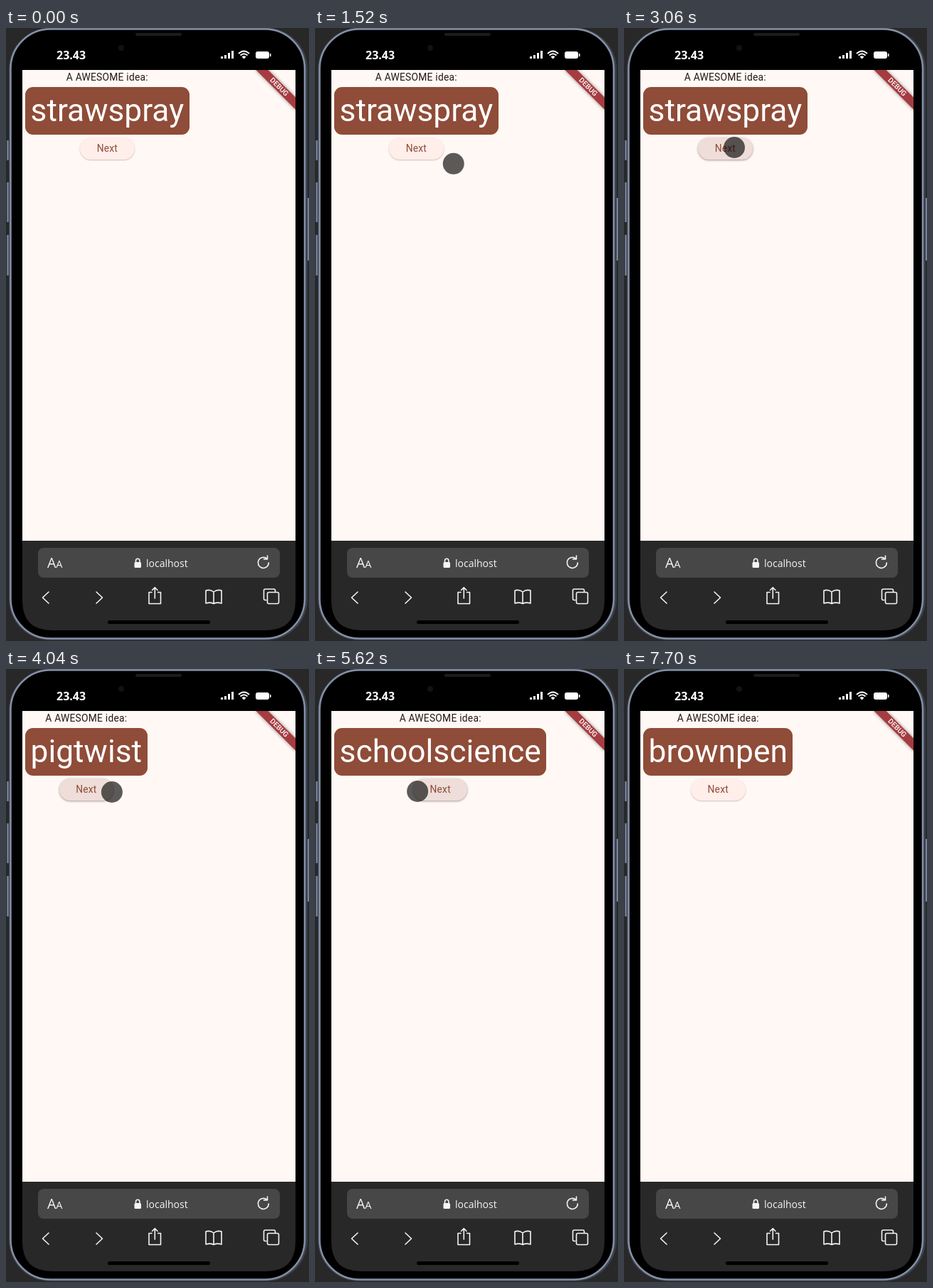
An HTML page for the animation above (8300 ms loop, 426 by 862 pixels).

```html
<!DOCTYPE html>
<html lang="en">
<head>
<meta charset="utf-8">
<title>Word idea app</title>
<style>
html, body { margin: 0; width: 100%; height: 100%; overflow: hidden; background: #282828; }
svg { position: absolute; left: 0; top: 0; }
#screen { position: absolute; left: 23px; top: 59px; width: 384px; height: 662px; overflow: hidden; background: #fff8f5; font-family: Roboto, sans-serif; }
#column { position: absolute; left: 0; top: 0; display: flex; flex-direction: column; align-items: center; white-space: nowrap; }
#label { position: relative; top: .5px; font-size: 13.8px; line-height: 19.7px; letter-spacing: .25px; color: #231917; }
#card { margin: 4px; padding: 7.9px 7.6px; border-radius: 11px; background: #8f4c38; color: #fff; font-size: 44.3px; line-height: 51.2px; }
#next { box-sizing: border-box; height: 31.5px; padding: 0 23.6px; border-radius: 16px; font-size: 13.8px; line-height: 31.5px; letter-spacing: .2px; color: #8f4c38; }
#banner { position: absolute; left: 320.5px; top: 17.8px; width: 80px; height: 11.8px; transform: rotate(45deg); background: #a63c40; box-shadow: 0 0 5px rgba(0,0,0,.45); color: #fff; font-size: 10px; font-weight: 500; line-height: 11.8px; text-align: center; }
#touch { position: absolute; left: -15px; top: -15px; width: 30px; height: 30px; border-radius: 50%; background: rgba(0,0,0,.64); }
</style>
</head>
<body>
<svg width="426" height="862" viewBox="0 0 426 862" fill="none" font-family="'Open Sans', 'Noto Sans', sans-serif">
  <!-- phone body -->
  <path d="M2.500 158V186M2.500 217V273M2.500 291V348M425 239V327" stroke="#77839a" stroke-width="2.500"/>
  <rect x="4" y="0" width="420" height="861" rx="58" fill="#3b414c"/>
  <rect x="6.500" y="1.500" width="413.500" height="857" rx="56" fill="#000" stroke="#8490a6" stroke-width="2.500"/>
  <rect x="182" y="7" width="65" height="4" rx="2" fill="#1c1c1c"/>
  <circle cx="162" cy="28" r="4" fill="#10121a"/>
  <path d="M23 721H407V805Q407 847 365 847H65Q23 847 23 805Z" fill="#282828"/>
  <!-- status bar -->
  <g fill="#fff">
    <text x="71" y="43.500" font-size="16" font-weight="700">23.43</text>
    <path d="M302 40h3v3h-3zM307 38h3v5h-3zM312 35h3v8h-3zM317 32h3v11h-3z"/>
    <rect x="351" y="33" width="19" height="10" rx="3"/>
    <rect x="371" y="36" width="1.500" height="4"/>
    <path d="M331.500 40.500Q334.500 38 337.500 40.500L334.500 43.500Z"/>
  </g>
  <path d="M327 36Q334.500 29 342 36M329.500 38.500Q334.500 34 339.500 38.500" stroke="#fff" stroke-width="2"/>
  <!-- browser bar -->
  <rect x="45" y="731" width="340" height="42" rx="8" fill="#474747"/>
  <g fill="#f5f5f5">
    <text x="58" y="759" font-size="19.500">A<tspan font-size="14.500">A</tspan></text>
    <text x="197" y="757.500" font-size="14">localhost</text>
    <rect x="180.500" y="751" width="9.500" height="8" rx="1.500"/>
  </g>
  <g stroke="#f5f5f5" stroke-width="1.600" stroke-linecap="round" stroke-linejoin="round">
    <path d="M182.500 751V749a2.700 2.700 0 0 1 5.400 0V751"/>
    <path d="M367 746.500A7.500 7.500 0 1 0 369.300 752M367.500 742V747H362.500"/>
    <path d="M60 793L51.500 801L60 809M127 793L135.500 801L127 809"/>
    <path d="M205 793.500H201V809.500H217.500V793.500H213.500M209.300 802V787M205.500 790.500L209.300 786.700L213 790.500"/>
    <path d="M292 793Q287 789 281 791V809Q287 807 292 809.500Q297 807 303 809V791Q297 789 292 793V809"/>
    <path d="M366 804.500H364.500Q362.500 804.500 362.500 802.500V791Q362.500 789 364.500 789H376.500Q378.500 789 378.500 791V793"/>
    <rect x="367.500" y="793.500" width="16" height="16" rx="2"/>
  </g>
  <rect x="143" y="833" width="144" height="5" rx="2.500" fill="#000"/>
</svg>
<div id="screen">
  <div id="column">
    <div id="label">A AWESOME idea:</div>
    <div id="card"></div>
    <div id="next">Next</div>
  </div>
  <div id="banner">DEBUG</div>
  <div id="touch"></div>
</div>
<script>
const LOOP = 8300, ENTER = 820, LEAVE = 7280;
const [card, next, touch] = ['card', 'next', 'touch'].map(id => document.getElementById(id));

const words = ['strawspray', 'pigtwist', 'schoolscience', 'brownpen'];
const clicks = [3100, 5320, 6880];

// Pointer strokes; each one eases out with the given power towards x, y.
const start = { x: 392, y: 221 };
const strokes = [
  { from: ENTER, to: 1380, x: 214, y: 197, power: 6 },
  { from: 1400, to: 1960, x: 164, y: 181, power: 2 },
  { from: 2300, to: 2500, x: 155, y: 168, power: 2 },
  { from: 4000, to: 4040, x: 149, y: 173, power: 1 },
  { from: 4040, to: 4360, x: 131, y: 172, power: 2 },
  { from: 5560, to: 5860, x: 167, y: 172, power: 2 }
];

const ramp = (t, from, to) => Math.min(1, Math.max(0, (t - from) / (to - from)));
const mix = (a, b, k) => a + (b - a) * k;

function pointerAt(t) {
  let { x, y } = start;
  for (const s of strokes) {
    const k = 1 - (1 - ramp(t, s.from, s.to)) ** s.power;
    x = mix(x, s.x, k);
    y = mix(y, s.y, k);
  }
  return { x, y };
}

function draw(t) {
  const word = words[clicks.filter(c => c <= t).length];
  if (card.textContent !== word) card.textContent = word;

  // The button is tinted and raised from the first press until the pointer has left.
  const focus = ramp(t, 2300, 2500) - ramp(t, LEAVE, 7700);
  next.style.background = `rgb(${mix(255, 238, focus)},${mix(238, 221, focus)},${mix(234, 216, focus)})`;
  next.style.boxShadow = `0 1px ${2 + focus}px rgba(60,30,20,${mix(.25, .45, focus)})`;

  const { x, y } = pointerAt(t);
  touch.hidden = t < ENTER || t >= LEAVE;
  touch.style.transform = `translate(${x - 23}px,${y - 59}px)`;
}

function tick() {
  draw(performance.now() % LOOP);
  requestAnimationFrame(tick);
}
tick();
</script>
</body>
</html>
```
